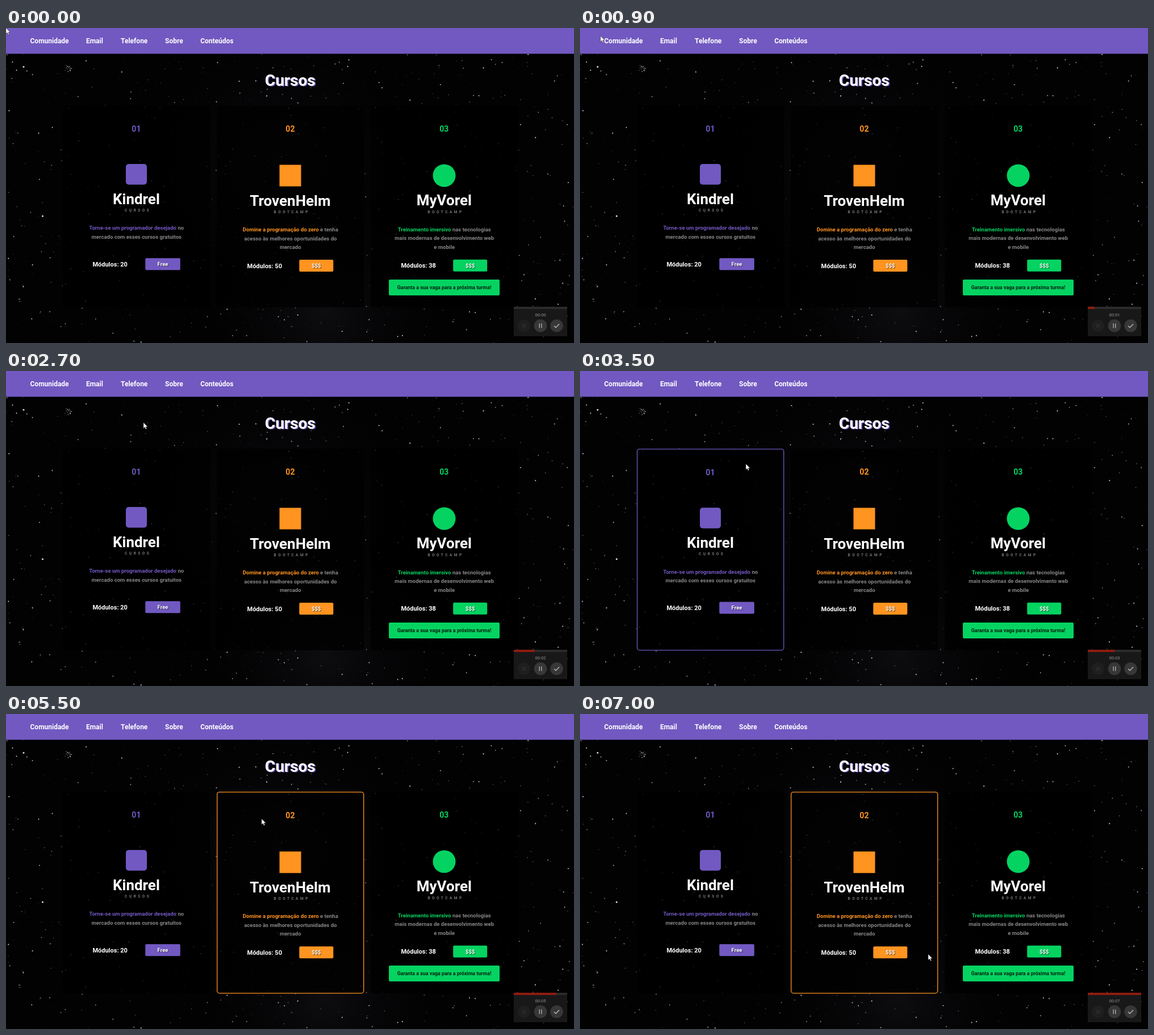
Recreate the animation shown at these times as an HTML page with a canvas. Size 1000 by 556 pixels, loop 7100 ms.

```html
<!DOCTYPE html>
<html lang="pt-BR">
<head>
<meta charset="utf-8">
<title>Cursos</title>
<style>
  html, body { margin: 0; width: 100%; height: 100%; overflow: hidden; background: #020203; }
  canvas, svg { position: absolute; left: 0; top: 0; width: 1000px; height: 556px; }
  text { font-family: Roboto, Arial, sans-serif; font-weight: 700; fill: #fff; }
  .mid { text-anchor: middle; }
  .nav { font-size: 12px; }
  .title { font-size: 28px; text-shadow: 1.6px 1.4px 0 #7159c1; }
  .num { font-size: 14px; }
  .name { font-size: 26px; }
  .kind { font-size: 6.5px; letter-spacing: 3.5px; fill: #77777a; }
  .info { font-size: 9.55px; fill: #858487; }
  .mods { font-size: 11px; }
  .price { font-size: 9.6px; text-shadow: 1px 1px 1px #0009; }
  .cta { font-size: 8.9px; fill: #08210f; }
  .clock { font-size: 7.6px; font-weight: 400; fill: #949494; }
</style>
</head>
<body>
<canvas id="sky" width="1000" height="556"></canvas>
<svg viewBox="0 0 1000 556">
  <rect width="1000" height="45.5" fill="#7159c1"/>
  <g id="nav"></g>
  <text class="title mid" x="500.3" y="102">Cursos</text>
  <g id="cards"></g>
  <g id="recorder">
    <rect x="894" y="492" width="94" height="52" fill="#1b1b1c" opacity=".92"/>
    <rect x="894" y="492" width="94" height="4" fill="#2b2b2c"/>
    <rect id="bar" x="894" y="492" height="4" fill="#8f1c0e"/>
    <text id="clock" class="clock mid" x="941" y="508.5"></text>
    <circle cx="912" cy="525.5" r="11" fill="#1f1f20"/>
    <circle cx="941" cy="525.5" r="11.3" fill="#373738"/>
    <circle cx="969.5" cy="525.5" r="11.3" fill="#373738"/>
    <g fill="none" stroke-width="1.5">
      <path d="M908.5 522l7 7m0-7l-7 7" stroke="#303031"/>
      <path d="M939.2 521.5v8m3.6-8v8" stroke="#a5a5a5"/>
      <path d="M965 525.8l3 3 6-6.2" stroke="#b5b5b5"/>
    </g>
  </g>
  <path id="cursor" d="M0 0V10.3L2.4 8.1 4 11.8 5.7 11 4.1 7.4H7.4Z" fill="#fff" stroke="#222" stroke-width=".5"/>
</svg>
<script>
const $ = id => document.getElementById(id);
const LOOP = 7100, TOP = 137.5, CARD_W = 258, CARD_H = 355;

function drawSky() {
  const c = $('sky').getContext('2d');
  let seed = 77;
  const rnd = () => (seed = seed * 16807 % 2147483647) / 2147483647;
  const glow = (x, y, r, color) => {
    const g = c.createRadialGradient(x, y, 0, x, y, r);
    g.addColorStop(0, color);
    g.addColorStop(1, 'transparent');
    c.fillStyle = g;
    c.fillRect(x - r, y - r, 2 * r, 2 * r);
  };
  const star = (x, y, r, a) => {
    c.fillStyle = `rgba(225,228,235,${a})`;
    c.beginPath();
    c.arc(x, y, r, 0, 7);
    c.fill();
  };
  c.fillStyle = '#020203';
  c.fillRect(0, 0, 1000, 556);
  glow(480, 240, 260, '#1c1c2266');
  glow(560, 500, 240, '#1a1a1f77');
  for (let i = 0; i < 2300; i++) {
    const b = rnd() ** 5;
    star(rnd() * 1000, 46 + rnd() * 510, 0.4 + b * 0.7, 0.12 + b * 0.75);
  }
  // small cluster and the two brightest stars
  for (let i = 0; i < 22; i++) star(111 + (rnd() - rnd()) * 7, 71 + (rnd() - rnd()) * 7, 0.7, 0.6);
  star(31, 68.5, 1.5, 0.95);
  star(64.5, 332, 1.6, 0.95);
}

const text = (cls, x, y, s, color) =>
  `<text class="${cls}" x="${x}" y="${y}"${color ? ` style="fill:${color}"` : ''}>${s}</text>`;
const box = (x, y, w, h, color, r = 2) =>
  `<rect x="${x}" y="${y}" width="${w}" height="${h}" rx="${r}" fill="${color}"/>`;

const cards = [
  { x: 100.7, color: '#7159c1', name: 'Kindrel', kind: 'CURSOS', dy: 0, mods: 20, price: 'Free', btn: 61.5,
    logo: box(211, 240, 37, 36.5, '#7159c1', 5),
    strong: 'Torne-se um programador desejado',
    lines: [' no', 'mercado com esses cursos gratuitos'] },
  { x: 371.7, color: '#ff9420', name: 'TrovenHelm', kind: 'BOOTCAMP', dy: 2.8, mods: 50, price: '$$$', btn: 60,
    logo: box(481.5, 241.5, 38, 38, '#ff9420', 0),
    strong: 'Domine a programação do zero',
    lines: [' e tenha', 'acesso às melhores oportunidades do', 'mercado'] },
  { x: 642.6, color: '#04d361', name: 'MyVorel', kind: 'BOOTCAMP', dy: 2.5, mods: 38, price: '$$$', btn: 60,
    logo: '<circle cx="771.5" cy="260.5" r="20" fill="#04d361"/>',
    strong: 'Treinamento imersivo',
    lines: [' nas tecnologias', 'mais modernas de desenvolvimento web', 'e mobile'],
    cta: 'Garanta a sua vaga para a próxima turma!' }
];

function cardMarkup(k, i) {
  const mid = k.x + 128.7, dy = k.dy, btnX = k.x + 144.6;
  const info = k.lines.map((s, n) => text('info mid', mid + 0.4, 356.4 + dy + n * 15.5,
    n ? s : `<tspan fill="${k.color}">${k.strong}</tspan>${s}`)).join('');
  return box(k.x - 0.6, TOP - 0.6, CARD_W + 1.2, CARD_H + 1.2, '#000000c8', 4) +
    `<rect id="edge${i}" x="${k.x}" y="${TOP + 0.3}" width="${CARD_W}" height="${CARD_H}" rx="4"
      fill="none" stroke="${k.color}" stroke-width="1.3"/>` +
    `<g id="body${i}">` +
    text('num mid', mid, 183, `0${i + 1}`, k.color) + k.logo +
    text('name mid', mid, 310.8 + dy, k.name) +
    text('kind mid', mid + 2.8, 324.3 + dy, k.kind) + info +
    text('mods', k.x + (i ? 52.8 : 51.7), 420.8 + dy, `Módulos: ${k.mods}`) +
    box(btnX, 406.2 + dy, k.btn, 21, k.color) +
    text('price mid', btnX + k.btn / 2, 420 + dy, k.price) +
    (k.cta ? box(674, 444, 195, 28, k.color) + text('cta mid', mid + 0.2, 461, k.cta) : '') +
    '</g>';
}

// pointer path: time, x, y
const path = [
  [0, 0, 0], [900, 36, 14], [2700, 242, 91], [3500, 292, 164],
  [4500, 443, 193], [5500, 450, 185], [7000, 613, 424], [LOOP, 613, 424]
];

function pointer(t) {
  const i = path.findIndex(p => p[0] > t);
  const [a, b] = [path[i - 1], path[i]];
  const f = (t - a[0]) / (b[0] - a[0]);
  return [1, 2].map(n => a[n] + (b[n] - a[n]) * f);
}

function render(now) {
  const t = Math.floor(now % LOOP / 100) * 100;
  const [x, y] = pointer(t);
  $('cursor').setAttribute('transform', `translate(${x} ${y})`);
  cards.forEach((k, i) => {
    const over = x >= k.x && x <= k.x + CARD_W && y >= TOP && y <= TOP + CARD_H;
    $('edge' + i).setAttribute('visibility', over ? 'visible' : 'hidden');
    $('body' + i).setAttribute('transform', `translate(0 ${over ? 1.2 : 0})`);
  });
  $('bar').setAttribute('width', Math.min(94, t * 0.0136));
  $('clock').textContent = '00:0' + Math.floor((t + 100) / 1000);
}

drawSky();
$('nav').innerHTML = [['Comunidade', 42.5], ['Email', 140.9], ['Telefone', 202], ['Sobre', 280], ['Conteúdos', 342.2]]
  .map(([s, x]) => text('nav', x, 27, s)).join('');
$('cards').innerHTML = cards.map(cardMarkup).join('');

const start = performance.now();
function loop() {
  render(performance.now() - start);
  requestAnimationFrame(loop);
}
loop();
</script>
</body>
</html>
```
